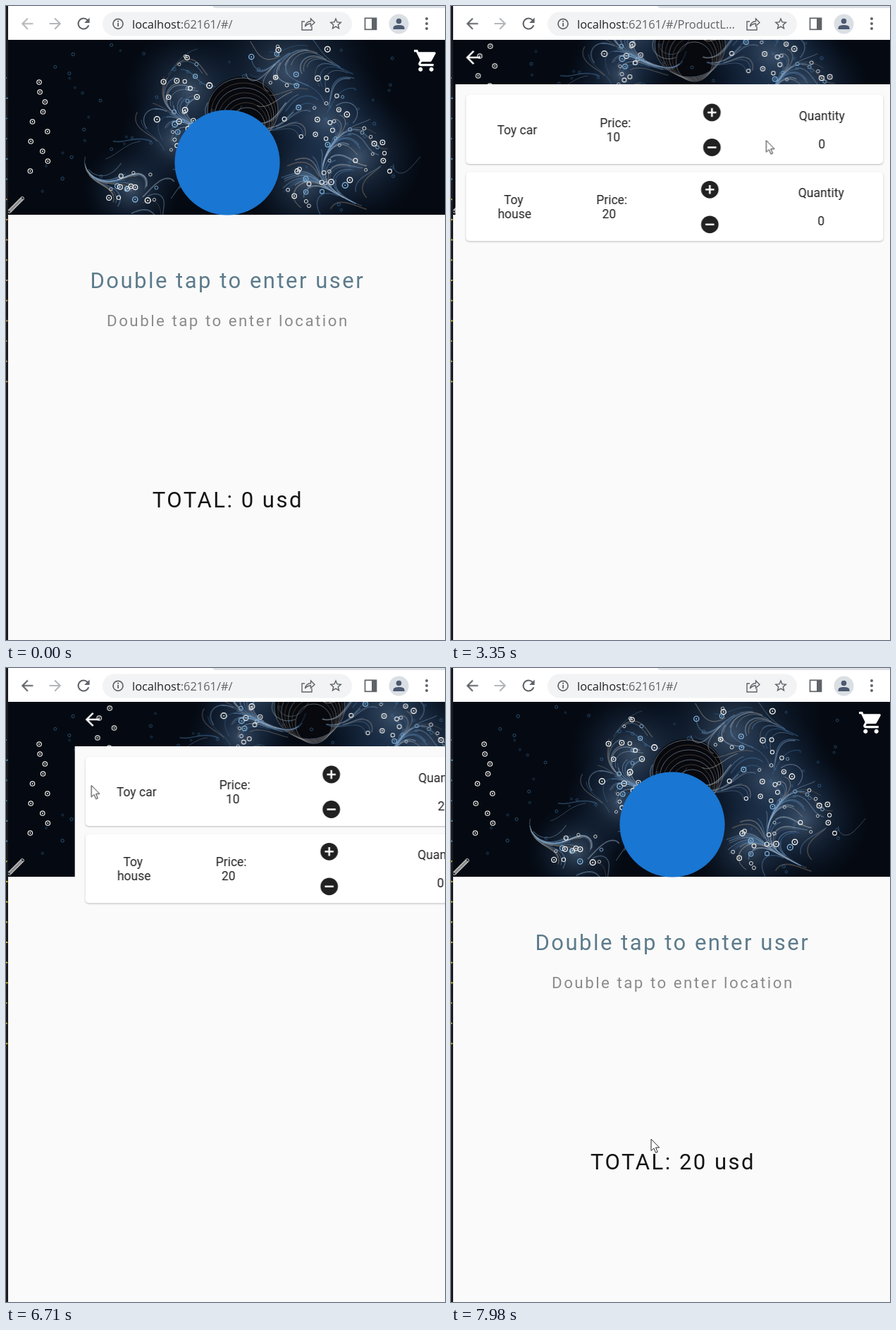
Animation, 623 px wide and 899 px high, one loop 8000 ms. Source, as an HTML page with a canvas:

```html
<!DOCTYPE html>
<html lang="en">
<head>
<meta charset="utf-8">
<title>Toy shop</title>
<style>
html, body { margin: 0; width: 100%; height: 100%; overflow: hidden; background: #fafafa; }
#stage { position: absolute; left: 0; top: 0; width: 623px; height: 899px; overflow: hidden; }
#stage div, svg, canvas { position: absolute; left: 0; top: 0; }
#app { width: 623px; height: 899px; clip-path: inset(48px 0 0 3px); }
canvas { left: 3px; top: 48px; }
svg { display: block; overflow: hidden; }
text { font-family: Roboto, sans-serif; }
.url { font: 16.4px "Open Sans", sans-serif; }
.big { font-size: 31px; letter-spacing: 2.5px; }
.small { font-size: 22.3px; letter-spacing: 2.5px; }
.card text { font-size: 17.5px; fill: #212121; text-anchor: middle; }
.card rect { fill: #fff; filter: drop-shadow(0 1px 1.3px rgba(0,0,0,.26)); }
#list { width: 623px; height: 899px; transform: translateX(620px); }
</style>
</head>
<body>
<div id="stage">
  <div id="app">
    <canvas id="hero" width="620" height="248"></canvas>
    <svg width="623" height="899">
      <rect x="3" y="296" width="620" height="603" fill="#fafafa"/>
      <circle cx="314" cy="222" r="74.6" fill="#1976d2"/>
      <path fill="#fff" transform="translate(577.5 59) scale(1.54)" d="M7 18c-1.1 0-1.99.9-1.99 2S5.9 22 7 22s2-.9 2-2-.9-2-2-2zM1 2v2h2l3.6 7.59-1.35 2.45c-.16.28-.25.61-.25.96 0 1.1.9 2 2 2h12v-2H7.42c-.14 0-.25-.11-.25-.25l.03-.12.9-1.63h7.45c.75 0 1.41-.41 1.75-1.03l3.58-6.49A1 1 0 0 0 20 4H5.21l-.94-2zm16 16c-1.1 0-1.99.9-1.99 2s.89 2 1.99 2 2-.9 2-2-.9-2-2-2z"/>
      <text class="big" x="119.4" y="400" fill="#5d7b8b">Double tap to enter user</text>
      <text class="small" x="143" y="454" fill="#8b8b8b">Double tap to enter location</text>
      <text id="total0" class="big" x="207.800" y="711" fill="#141414">TOTAL: 0 usd</text>
      <text id="total20" class="big" x="198" y="711" fill="#141414">TOTAL: 20 usd</text>
    </svg>
    <div id="list">
      <svg width="623" height="899"><rect x="3" y="48" width="620" height="851" fill="#fafafa"/></svg>
      <canvas id="strip" width="620" height="63"></canvas>
      <svg width="623" height="899">
        <use href="#arrow" fill="#fff" transform="translate(13 58) scale(1.25)"/>
        <g id="cards"></g>
        <circle id="ripple" cx="367" cy="151" r="28" opacity="0"/>
      </svg>
    </div>
  </div>

  <svg width="623" height="899">
    <defs><path id="arrow" d="M20 11H7.83l5.590-5.590L12 4l-8 8 8 8 1.410-1.410L7.830 13H20z"/></defs>
    <rect width="3" height="899" fill="#1b1b1f"/>
    <g id="marksA"></g>
    <g id="marksB"></g>
    <rect x="3" width="620" height="48" fill="#fff"/>
    <path d="M293 0H623V3H298Q294 3 293 0" fill="#dee1e6"/>
    <rect x="137" y="8.5" width="354" height="34" rx="17" fill="#f1f3f4"/>
    <g fill="#5f6368">
      <use id="backOff" href="#arrow" fill="#b4b7ba" transform="translate(17.6 12.6) scale(1.04)"/>
      <use id="backOn" href="#arrow" transform="translate(17.6 12.6) scale(1.04)"/>
      <use href="#arrow" fill="#b4b7ba" transform="translate(82.4 12.6) scale(-1.04 1.04)"/>
      <path transform="translate(97.2 12.2) scale(1.07)" d="M17.65 6.35A7.95 7.95 0 0 0 12 4a8 8 0 1 0 7.73 10h-2.08A6 6 0 1 1 12 6c1.66 0 3.14.69 4.22 1.78L13 11h7V4z"/>
      <path d="M158.2 24h1.8v5h-1.8zM158.2 20.8h1.8v1.9h-1.8z"/>
      <path transform="translate(457.2 14.4) scale(.9)" d="M22 9.24l-7.19-.62L12 2 9.19 8.63 2 9.24l5.46 4.73L5.82 21 12 17.27 18.18 21l-1.63-7.03zM12 15.4l-3.76 2.27 1-4.28-3.32-2.88 4.38-.38L12 6.1l1.71 4.04 4.38.38-3.32 2.88 1 4.28z"/>
      <path d="M519 17h7v17h-7z"/>
      <circle cx="597" cy="18" r="2"/><circle cx="597" cy="25" r="2"/><circle cx="597" cy="32" r="2"/>
    </g>
    <g fill="none" stroke="#5f6368" stroke-width="1.7">
      <circle cx="159" cy="25.3" r="7"/>
      <rect x="509.5" y="17.3" width="16" height="16"/>
      <path d="M424 22h-4v12h14v-5M424.5 29q1-7 8-7.300V18l5.500 5.500-5.500 5v-3.500q-5 0-8 4z" stroke-width="1.4"/>
    </g>
    <circle cx="557.5" cy="25.5" r="14" fill="#dadfe4"/>
    <g fill="#4c5a70"><circle cx="557.5" cy="21.5" r="3.8"/><path d="M549.5 33v-2q0-4 8-4t8 4v2z"/></g>
    <text class="url" x="179" y="31.5" fill="#5f6368"><tspan fill="#202124">localhost</tspan>:62161/#/<tspan id="route">ProductL...</tspan></text>
    <path id="cursor" d="M0 0V16.5L3.9 13 6.6 19.3 9.2 18.2 6.5 12H11.7Z" fill="#fff" stroke="#26282e" opacity="0"/>
  </svg>
</div>

<script>
const LOOP = 8000;
const $ = id => document.getElementById(id);

function random(seed) {
  return () => (seed = seed * 16807 % 2147483647) / 2147483647;
}

// Header art: soft glows, each with strands along a flow field and bubbles.
// x, y, radius
const LOBES = [[400, 95, 85], [238, 190, 50], [178, 260, 45], [455, 165, 65], [425, 250, 55], [260, 120, 60], [500, 215, 60]];

function paint(canvas, top) {
  const c = canvas.getContext('2d'), rnd = random(91);
  const near = r => (rnd() + rnd() - 1) * r;
  const oval = (x, y, rx, ry, color, fill) => {
    c.beginPath();
    c.ellipse(x, y, rx, ry, 0, 0, 7);
    c.fillStyle = c.strokeStyle = color;
    fill ? c.fill() : c.stroke();
  };
  const bubble = (x, y, r, color) => {
    c.lineWidth = r / 2.6;
    oval(x, y, r, r, color);
    if (r > 3) oval(x, y, 1, 1, color, true);
  };
  c.translate(-3, -top);
  c.fillStyle = '#050a12';
  c.fillRect(3, 48, 620, 249);

  for (const [x, y, r] of LOBES) {
    const g = c.createRadialGradient(x, y, 0, x, y, r * 1.5);
    g.addColorStop(0, 'rgba(96,124,156,.6)');
    g.addColorStop(.4, 'rgba(48,74,106,.4)');
    g.addColorStop(1, 'rgba(15,40,75,0)');
    c.fillStyle = g;
    c.fillRect(3, 48, 620, 249);
  }
  oval(336, 146, 50, 46, '#07090e', true);
  c.lineWidth = 1;
  for (let i = 0; i < 7; i++) oval(336 + i, 148 + i * 4, 50 - i * 4, 46 - i * 3, i % 2 ? '#806c5a77' : '#b4bfca77');

  for (const [cx, cy, r] of LOBES) {
    for (let i = 0; i < 26; i++) {
      let x = cx + near(r), y = cy + near(r);
      c.strokeStyle = `hsla(${i % 4 ? 210 : 30},${i % 4 ? 45 : 20}%,${45 + 35 * rnd()}%,.4)`;
      c.lineWidth = .7 + rnd();
      c.beginPath();
      c.moveTo(x, y);
      for (let k = 0; k < 14; k++) {
        const a = 2.2 * Math.sin(x / 36) + 1.9 * Math.cos(y / 29 + x / 90);
        c.lineTo(x += 4 * Math.cos(a), y += 4 * Math.sin(a));
      }
      c.stroke();
    }
    for (let i = 0; i < 16; i++) {
      bubble(cx + near(r * .9), cy + near(r * .9), 2 + 2 * rnd(), i % 4 ? '#eeece8' : '#7fb0d8');
    }
  }
  for (let i = 0; i < 60; i++) bubble(50 + rnd() * 500, 55 + rnd() * 235, 1.2 + rnd(), '#4583b8aa');
  for (let i = 0; i < 10; i++) {
    bubble(48 + near(18), 108 + i * 14, 3.2, '#eeece8');
    bubble(5 + i * 2, 291 - i * 2, 2.4, '#eeece8');
  }
}
paint($('hero'), 48);
paint($('strip'), 141);

// Product cards
const label = (x, y, s, id = '') => `<text x="${x}" y="${y}" ${id && `id="${id}"`}>${s}</text>`;
const knob = (x, y, plus) => `<circle cx="${x}" cy="${y}" r="12.4" fill="#212121"/>
  <path d="M${x - 6.2} ${y}h12.4${plus ? `M${x} ${y - 6.2}v12.4` : ''}" stroke="#fff" stroke-width="2.5"/>`;
const card = (y, dx, name, price, qty) => `<g class="card">
  <rect x="18" y="${y}" width="592" height="98" rx="5"/>${name}
  ${label(230 + dx * 1.7, y + 45.5, 'Price:')}${label(227 + dx * 2, y + 65.5, price)}
  ${knob(367 + dx, y + 25, true)}${knob(367 + dx, y + 74.5, false)}
  ${label(523 + dx / 3, y + 35.5, 'Quantity')}${qty}</g>`;
$('cards').innerHTML =
  card(126, 0, label(90.5, 181.5, 'Toy car'), 10,
    [0, 1, 2].map(n => label(523, 201.5, n, 'qty' + n)).join('')) +
  card(235.3, -3, label(85.5, 281, 'Toy') + label(87, 300.5, 'house'), 20, label(522, 310.5, 0));

// Edge of the editor window behind the browser
function marks(id, color) {
  const rnd = random(7);
  for (let y = 101; y < 560; y += 28.7) {
    $(id).innerHTML += `<rect y="${y}" width="${1 + 2 * rnd()}" height="2" fill="${y < 250 ? '#4a7f9e' : color}"/>`;
  }
}
marks('marksA', '#c08a4c');
marks('marksB', '#c2b22a');

// Motion
const play = (id, frames) => $(id).animate(frames, { duration: LOOP, iterations: Infinity });
// Shows an element from one time to another with hard changes
function show(id, from, to = LOOP) {
  const key = (t, opacity) => ({ offset: t / LOOP, opacity, easing: 'step-end' });
  play(id, [key(0, 0), key(from, 1), key(to, 0), key(LOOP, 0)]);
}
const PUSH = 2460, POP = 6456, SLIDE = 940, EDIT = 2280, TAPS = [4350, 4690];

show('marksA', 0, EDIT);
show('marksB', EDIT);
show('backOff', 0, 2400);
show('backOn', 2400);
show('route', 2400, 6380);
show('total0', 0, POP);
show('total20', POP);
show('qty0', 0, TAPS[0] + 70);
show('qty1', TAPS[0] + 70, TAPS[1] + 70);
show('qty2', TAPS[1] + 70);
show('cursor', 440);

const slide = (t, x) => ({ offset: t / LOOP, transform: `translateX(${x}px)`, easing: 'ease-in-out' });
play('list', [slide(0, 620), slide(PUSH, 620), slide(PUSH + SLIDE, 0),
  slide(POP, 0), slide(POP + SLIDE, 620), slide(LOOP, 620)]);

play('ripple', [{ opacity: 0 }, ...TAPS.flatMap(t => [[0, 0], [70, .09], [210, 0]].map(([dt, opacity]) =>
  ({ offset: (t + dt) / LOOP, opacity }))), { opacity: 0 }]);

// Each stroke runs from one time to another through evenly timed points
const STROKES = [
  [440, 1190, [[466, 866], [350, 785], [325, 660], [350, 550], [391, 401]]],
  [1190, 1890, [[391, 401], [519.5, 198], [597, 81]]],
  [2670, 3350, [[597, 81], [540, 125], [447.5, 190.5]]],
  [3350, 4150, [[447.5, 190.5], [400, 219], [349, 170], [368, 147]]],
  [5400, 5890, [[368, 147], [30.5, 86.5]]],
  [6450, 6970, [[30.5, 86.5], [120.5, 165], [314.5, 630]]],
  [6970, 7980, [[314.5, 630], [256, 712], [310, 680], [374, 650], [284, 668]]]
];

// Catmull-Rom point at u, counted in points
function spline(p, u) {
  const i = Math.min(Math.floor(u), p.length - 2), f = u - i;
  const [a, b, c, d] = [-1, 0, 1, 2].map(k => p[Math.min(Math.max(i + k, 0), p.length - 1)]);
  return [0, 1].map(j => b[j] + f / 2 * (c[j] - a[j] +
    f * (2 * a[j] - 5 * b[j] + 4 * c[j] - d[j] + f * (3 * (b[j] - c[j]) + d[j] - a[j]))));
}
const place = (t, [x, y]) => ({ offset: t / LOOP, transform: `translate(${x}px,${y}px)` });
const steps = STROKES.flatMap(([from, to, p]) => Array.from({ length: 13 }, (_, i) =>
  place(from + (to - from) * i / 12, spline(p, (p.length - 1) * i / 12))));
play('cursor', [place(0, [466, 866]), ...steps, place(LOOP, [284, 668])]);
</script>
</body>
</html>
```
